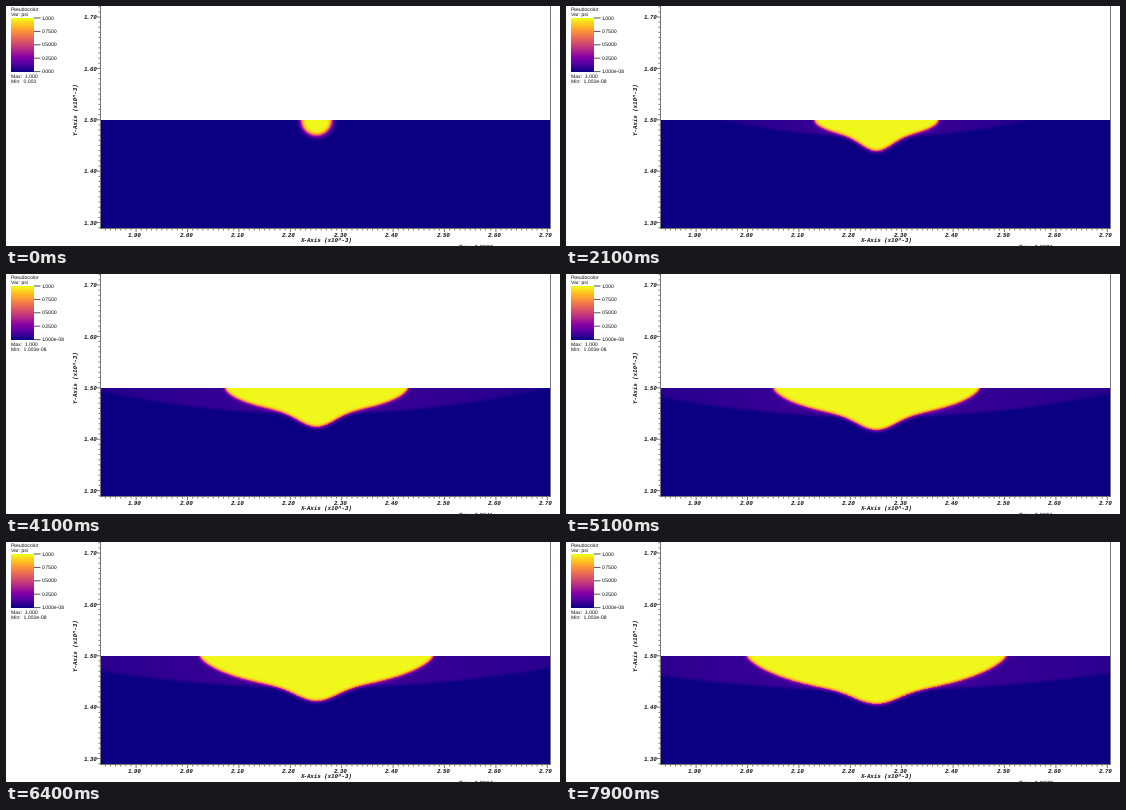
These frames come from a looping animation (554 px wide and 240 px high, 8 s). A matplotlib script:

```python
import numpy as np
import matplotlib.pyplot as plt
from matplotlib.animation import FuncAnimation
from matplotlib.colors import ListedColormap

W, H, DPI = 554, 240, 100
FRAMES, STEP = 80, 100
LEFT, RIGHT, TOP, BOTTOM = 95, 544, 114, 222
CENTER = 310
UNIT = 51.4  # pixels per 0.1 on both axes
GREY = "#777777"

# Growth of the molten zone: time (s), half width and depth (px)
TIMES = [0, 1.3, 2.1, 3.2, 5.1, 6.4, 7.9]
WIDTHS = np.array([15.5, 46, 62, 79.5, 103, 116.5, 129.5])
DEPTHS = np.array([15.5, 26, 31, 36, 42, 45, 48])

# Plasma with a slightly deeper blue end
rgb = plt.get_cmap("plasma")(np.linspace(0, 1, 256))[:, :3]
rgb[:, 1:] = np.clip((rgb[:, 1:] - 0.03) / 0.97, 0, 1)
CMAP = ListedColormap(rgb)

plt.rcParams["text.hinting"] = "none"
fig = plt.figure(figsize=(W / DPI, H / DPI), dpi=DPI, facecolor="white")
ax = fig.add_axes([0, 0, 1, 1])
ax.axis("off")


def label(x, y, s, size=5.1, ha="left", va="center_baseline", **kw):
    kw.setdefault("family", "Liberation Sans")
    return ax.text(x, y, s, fontsize=size * 72 / DPI, ha=ha, va=va,
                   color="#111111", **kw)


def mono(x, y, s, **kw):
    return label(x, y, s, size=5.8, ha="center", family="Liberation Mono",
                 weight="bold", style="italic", **kw)


def line(xs, ys, color=GREY):
    ax.plot(xs, ys, color=color, lw=72 / DPI, solid_capstyle="butt",
            snap=False)


def image(data, box):
    return ax.imshow(data, cmap=CMAP, vmin=0, vmax=1, aspect="auto",
                     extent=box, interpolation="nearest")


def draw_axes():
    line([94.5, 94.5], [0, 223])
    line([544.5, 544.5], [0, 223])
    line([94, 545], [222.5, 222.5])
    for i in range(184, 271):
        x = 181.5 + (i - 200) * UNIT / 10
        if LEFT <= x <= RIGHT:
            major = i % 10 == 0
            line([x, x], [223, 226 if major else 224.5])
            if major:
                mono(x - 1, 228.6, f"{i / 100:.2f}")
    for i in range(129, 173):
        y = 113.8 - (i - 150) * UNIT / 10
        if 0 <= y <= BOTTOM:
            major = i % 10 == 0
            line([91 if major else 92.5, 94], [y, y])
            if major:
                mono(84.3, y, f"{i / 100:.2f}")
    mono(320, 234, "X-Axis (x10^-3)")
    mono(70.5, 103.5, "Y-Axis (x10^-3)", rotation=90, va="center")


def draw_legend():
    label(5, 2.8, "Pseudocolor")
    label(5, 8.4, "Var: psi")
    image(np.linspace(1, 0, 54)[:, None], (5, 28, 66, 12))
    for k, s in enumerate(["1.000", "0.7500", "0.5000", "0.2500", ""]):
        y = 12 + 13.4 * k
        line([28, 34.5], [y, y], "#555555")
        label(36, y - 0.3, s)
    label(5, 70, "Max:  1.000")


def field(t):
    """Phase value over the solid block at time t in seconds."""
    half = np.sqrt(np.interp(t, TIMES, WIDTHS ** 2))
    depth = np.interp(t, TIMES, DEPTHS)
    early = min(t, 1.0)
    grown = np.clip((half - 46) / 84, 0, 1)
    bump = early * (0.5 - 0.25 * grown)
    power = 0.5 + 0.2 * grown
    spread = 20 + 10 * grown

    def profile(d):
        lens = np.clip(1 - (d / half) ** 2, 0, None) ** power
        return depth * lens * (1 - bump + bump * np.exp(-(d / spread) ** 2))

    d = np.arange(0, RIGHT - CENTER + 1)[None, :]
    y = (np.arange(BOTTOM - TOP) + 0.5)[:, None]

    # Signed distance to the melt front gives an even soft edge
    px = half * np.sin(np.linspace(0, np.pi / 2, 120))
    gap = np.full((y.size, d.size), np.inf)
    for x0, y0 in zip(px, profile(px)):
        np.minimum(gap, (d - x0) ** 2 + (y - y0) ** 2, out=gap)
    side = np.where(y < profile(d), 1, -1)
    soft = 2.4 - 0.7 * early
    front = 0.5 + 0.5 * np.tanh(side * np.sqrt(gap) / soft)

    reach = 2.6 * half
    sink = 0.75 - 0.6 * np.exp(-t / 1.5)
    haze_depth = sink * depth * (1 - (d / reach) ** 2)
    haze = (0.03 + 0.07 * np.clip(1 - d / reach, 0, 1)) * min(t / 0.8, 1)
    haze = haze * np.clip((haze_depth - y) / 4, 0, 1)
    value = haze + (1 - haze) * front
    return value[:, np.abs(np.arange(LEFT, RIGHT) - CENTER)]


draw_axes()
draw_legend()
block = image(field(0), (LEFT, RIGHT, BOTTOM, TOP))
ax.set_xlim(0, W)
ax.set_ylim(H, 0)
low_tick = label(36, 65.4, "")
low_text = label(5, 75, "")
clock = label(453, 243, "", size=6, va="baseline")


def update(i):
    low = "1.000e-08" if i else "0.000"
    block.set_data(field(i * STEP / 1000))
    low_tick.set_text(low)
    low_text.set_text(f"Min:  {low}")
    clock.set_text(f"Time={i * 0.0001:.4f}")
    return block, low_tick, low_text, clock


anim = FuncAnimation(fig, update, frames=FRAMES, interval=STEP, repeat=True,
                     repeat_delay=0, blit=False)
plt.show()
```
